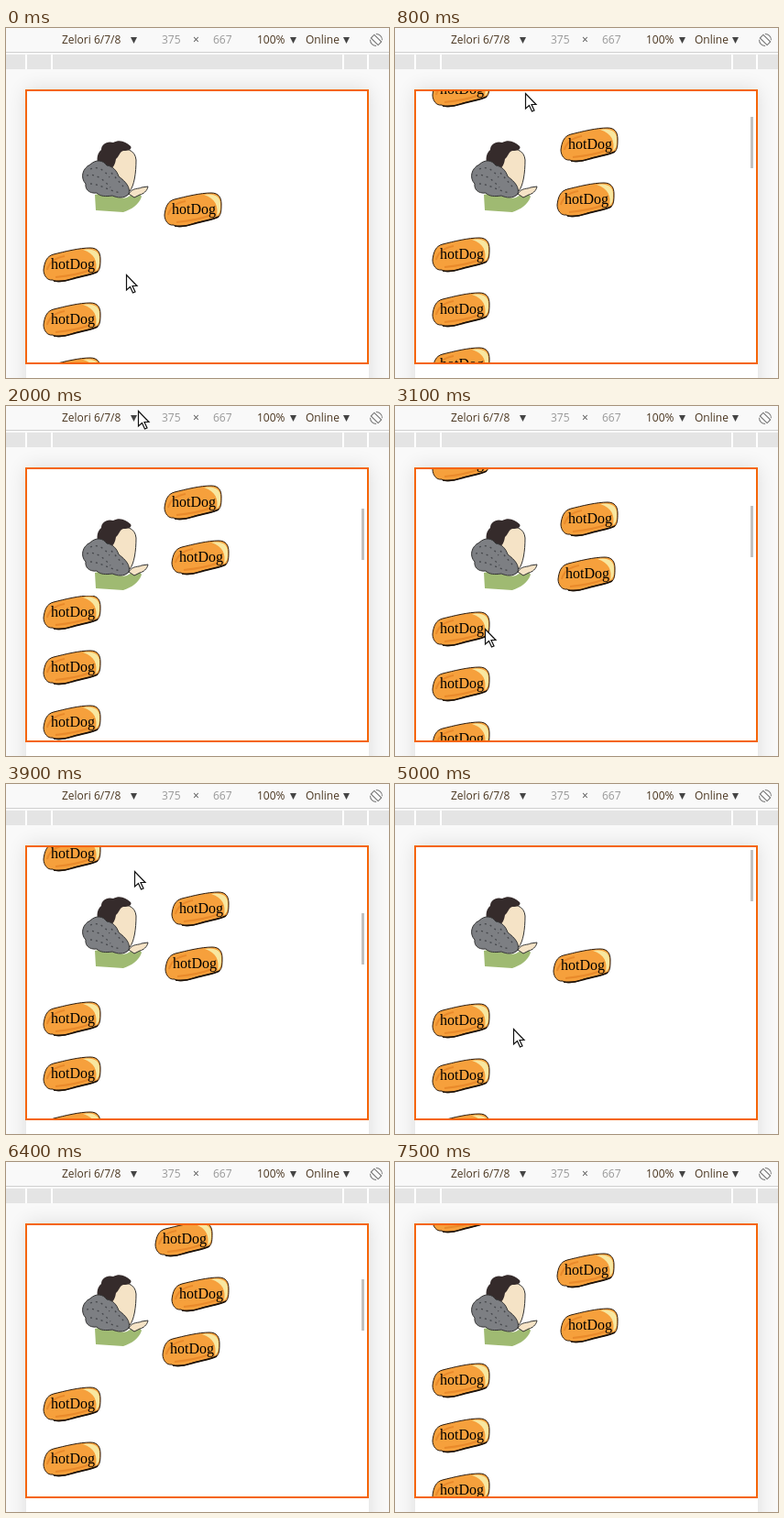
Recreate the animation shown at these times as an HTML page with a canvas. Size 418 by 382 pixels, loop 8.1 s.

```html
<!DOCTYPE html>
<html lang="en">
<head>
<meta charset="utf-8">
<title>Scrolling hotDog list</title>
<style>
html, body { margin: 0; width: 100%; height: 100%; overflow: hidden; background: #f9f9f9; }
canvas { display: block; }
</style>
</head>
<body>
<canvas id="stage" width="418" height="382"></canvas>
<script>
const ctx = document.getElementById('stage').getContext('2d');
const LOOP = 8100, STEP = 100, BUNS = 22, GAP = 60, FIRST_Y = 198, BASE_X = 72;
const ARC_Y = 152, ARC_RADIUS = 140;

// Each gesture moves the list and the pointer: start, end, scroll, pointer x, pointer y
const REST = [0, 131, 269];
const gestures = [
  [0, 300, 150, 140, 110],
  [600, 1500, 66, 150, -64],
  [1500, 2400, 330, 140, 60],
  [2400, 2700, 174, 93, 261],
  [3000, 3900, 362, 140, 95],
  [3900, 4800, 0, 129, 267],
  [5000, 5800, 602, 185, -4],
  [5800, 6700, 140, 185, -30],
  [7000, 7500, 200, 185, -30],
];

function pose(t) {
  return gestures.reduce((from, [start, end, ...to]) => {
    const p = Math.min(1, Math.max(0, (t - start) / (end - start)));
    return from.map((v, i) => v + (to[i] - v) * p);
  }, REST).map(Math.round);
}

// Buns passing the mouth swing out along a circle with a flat top
function swing(y) {
  if (y < 82 || y > 208) return 0;
  const d = Math.abs(y - ARC_Y);
  return d < 30 ? ARC_RADIUS : Math.round(Math.sqrt(ARC_RADIUS ** 2 - d ** 2));
}

function rect(color, x, y, w, h) {
  ctx.fillStyle = color;
  ctx.fillRect(x, y, w, h);
}

function shape(path, fill, stroke, width = 1) {
  const p = new Path2D(path);
  if (fill) { ctx.fillStyle = fill; ctx.fill(p); }
  if (stroke) { ctx.strokeStyle = stroke; ctx.lineWidth = width; ctx.stroke(p); }
}

function label(text, x, y, color, font = '12px "Open Sans", sans-serif') {
  ctx.fillStyle = color;
  ctx.font = font;
  ctx.fillText(text, x, y);
}

function at(x, y, draw) {
  ctx.save();
  ctx.translate(x, y);
  draw();
  ctx.restore();
}

function menu(text, x, arrowX) {
  label(text, x, 17, '#4a3620');
  shape(`M${arrowX} 10h7l-3.5 7z`, '#444');
}

function toolbar() {
  rect('#f9f9f9', 0, 0, 418, 27);
  rect('#d0d0d0', 0, 26, 418, 1);
  rect('#e4e4e4', 0, 29, 418, 16);
  for (const x of [21, 49, 367, 394]) rect('#fff', x, 29, 2, 16);
  menu('Zelori 6/7/8', 61, 136);
  label('375', 170, 17, '#999');
  label('×', 204, 17, '#555');
  label('667', 226, 17, '#999');
  menu('100%', 274, 310);
  menu('Online', 327, 368);
  at(404, 13, () => {
    ctx.rotate(-Math.PI / 4);
    shape('M-2.5 -5.5h5v11h-5z', null, '#666');
    shape('M4.5 -4.7A6.5 6.5 0 0 1 4.5 4.7M-4.5 4.7A6.5 6.5 0 0 1 -4.5 -4.7', null, '#777');
  });
}

function page() {
  rect('#f9f9f9', 0, 0, 418, 382);
  ctx.save();
  ctx.shadowColor = 'rgba(0, 0, 0, .12)';
  ctx.shadowBlur = 20;
  rect('#fff', 22, 67, 374, 400);
  ctx.restore();
}

function bun(x, y) {
  at(x, y, () => {
    shape('M-31 6C-30 -2 -28 -9 -20 -11C-8 -14 8 -18 20 -18C28 -18 31 -13 31 -6C31 0 31 5 28 8C20 12 8 13 -1 16C-8 19 -18 20 -21 17C-27 18 -31 12 -31 6Z', '#f6a03c', '#2a1a0c');
    shape('M12 -16C22 -18 30 -15 30 -6C30 0 30 4 26 7C28 -3 25 -12 12 -16Z', '#f8e7a0');
    shape('M-27 6C-25 -2 -19 -7 -8 -9M-18 14C-8 13 7 11 20 6', null, '#e98a2b', 2);
    shape('M-20 18C-12 19 -6 18 0 16C8 13 20 12 28 8', null, '#1c120a', 1.6);
    label('hotDog', -23, 5, '#000', '16px "Liberation Serif", serif');
  });
}

// Flat silhouette with a fur collar
function person() {
  rect('#fff', 83, 122, 72, 85);
  shape('M97 182C108 178 122 188 132 185L144 178L148 184C145 193 137 198 128 201L98 199Z', '#9fba72');
  shape('M120 133C131 130 141 133 142 144C142 158 140 172 135 178C129 181 118 174 114 158Z', '#f5e3c6', '#333');
  shape('M101 150C98 143 100 136 104 133C104 127 110 123 117 125C124 121 131 124 136 129C138 132 134 134 128 134C123 136 124 140 120 143C119 149 117 154 113 153C108 153 104 153 101 150Z', '#352b2b');
  shape('M134 181C138 174 145 176 148 174L155 173C154 178 150 181 146 182L140 185Z', '#f5e3c6', '#333');
  shape('M92 149C98 143 106 144 110 150C117 151 121 156 123 162C131 168 136 174 134 181C129 187 121 185 116 183C109 184 103 184 99 180C91 181 86 176 87 170C81 164 83 153 92 149Z', '#7d7f83', '#333');
  ctx.setLineDash([2, 4]);
  shape('M92 154C101 150 108 156 113 163M88 161C98 158 107 166 114 174M92 170C102 170 112 178 126 180M115 158L128 173', null, '#45474b', 1.3);
  ctx.setLineDash([]);
}

function draw(t) {
  const [scroll, pointerX, pointerY] = pose(t);
  page();
  toolbar();
  ctx.save();
  ctx.beginPath();
  ctx.rect(23, 69, 371, 296);
  ctx.clip();
  for (let i = 0; i < BUNS; i++) {
    const y = FIRST_Y + i * GAP - scroll;
    bun(BASE_X + swing(y), y);
  }
  person();
  if (t >= 700 && t < 7500) rect('#c1c1c1', 388, 72 + Math.round(scroll / 5.27), 3, 56);
  ctx.restore();
  ctx.strokeStyle = '#f56508';
  ctx.lineWidth = 2;
  ctx.strokeRect(22, 68, 373, 298);
  at(pointerX, pointerY, () =>
    shape('M.5 .5V17L4.5 13.5L7.5 20L10 19L7 12.5H12Z', '#fff', '#111', 1.2));
}

function tick() {
  draw(Math.floor(performance.now() % LOOP / STEP) * STEP);
  requestAnimationFrame(tick);
}
tick();
</script>
</body>
</html>
```
